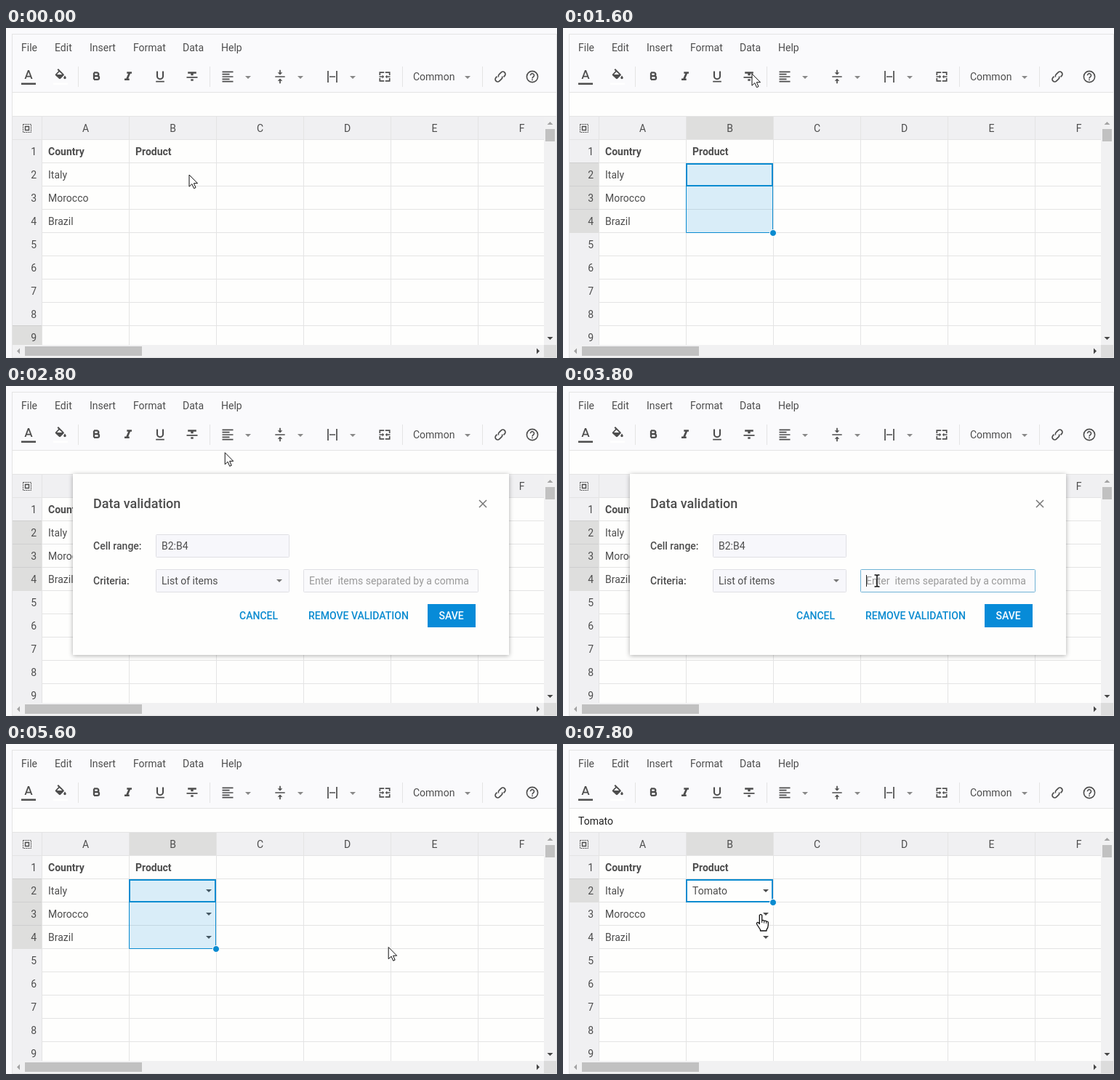
Recreate the animation shown at these times as an HTML page. Size 758 by 454 pixels, loop 8000 ms.

```html
<!DOCTYPE html>
<html lang="en">
<head>
<meta charset="utf-8">
<title>Spreadsheet data validation</title>
<style>
  html, body { margin: 0; width: 100%; height: 100%; overflow: hidden; background: #fafafc; }
  svg { display: block; }
  text { font: 14px Roboto, sans-serif; white-space: pre; }
  .shadow { filter: drop-shadow(0 1px 3px rgba(0, 0, 0, .32)); }
</style>
</head>
<body>
<svg id="stage" width="758" height="454" viewBox="0 0 758 454"></svg>
<script>
const INK = '#4d4d4d', MUTED = '#888', BLUE = '#0a8bd0', LINE = '#e4e4e4', PAPER = '#fefefd';
const HEAD = '#f0f0f2', ACTIVE = '#dededd';
const ITEMS = 'Tomato, Avocado, Pineapple';
const STEP = 200, LOOP = 8000;

const rect = (x, y, w, h, fill, more = '') =>
  `<rect x="${x}" y="${y}" width="${w}" height="${h}" fill="${fill}" ${more}/>`;
const text = (x, middle, value, { fill = INK, weight = 400, size = 14, anchor = 'start' } = {}) =>
  `<text x="${x}" y="${middle + 5}" fill="${fill}" text-anchor="${anchor}" style="font-weight:${weight};font-size:${size}px">${value}</text>`;
const shape = (d, fill = INK, more = '') => `<path d="${d}" fill="${fill}" ${more}/>`;
const stroke = (d, color = INK, width = 1.7, more = '') =>
  `<path d="${d}" fill="none" stroke="${color}" stroke-width="${width}" ${more}/>`;
const at = (x, y, content) => `<g transform="translate(${x} ${y})">${content}</g>`;
const caret = (x, y, fill = MUTED) => shape(`M${x - 4} ${y - 2}h8l-4 4z`, fill);
const hline = (x, y, w, color = LINE) => rect(x, y, w, 1, color);
const vline = (x, y, h, color = LINE) => rect(x, y, 1, h, color);

const columnX = i => 49 + 120 * i;
const rowY = n => 153 + 32 * (n - 1);

// Toolbar icons, each drawn around its own centre.
const icons = {
  color: shape('M-1-9h2L5.5 3H3.5L2.6.5H-2.6L-3.5 3H-5.5zM-2-1.2h4L0-6.6z', INK, 'fill-rule="evenodd"') + rect(-10, 8.5, 20, 2.5, INK),
  fill: shape('M-3-11L4.5-3.5q.8.9 0 1.8L0 2.8q-1 .9-2 0L-6.9-1.8q-.8-.9 0-1.8L-2.8-7.8-4.5-9.7zM-5-3h7.3L-1.5-6.7z', INK, 'fill-rule="evenodd"') +
    shape('M6-1.4q1.7 2 1.7 3a1.7 1.7 0 0 1-3.4 0q0-1 1.7-3z') + rect(-10, 8.5, 20, 2.5, '#fff'),
  bold: stroke('M-3-5.6V3.8M-3-5.6H1a2.3 2.3 0 0 1 0 4.6H-3M-3-1H1.6a2.4 2.4 0 0 1 0 4.9H-3', INK, 2.3),
  italic: shape('M-1.7-6.7H5v2.5H3.1L.3 2.5H1.7V5H-5V2.5h2.3L.2-4.2h-1.9z'),
  underline: stroke('M-4-7.5V-.8a4 4 0 0 0 8 0V-7.5', INK, 2.1) + rect(-5.8, 5.8, 11.6, 1.7, INK),
  strike: shape('M-5.8-6.7H5.8v2.5H1.7v2.5h-3.4v-2.5h-4.1zM-7.5 0h15v1.7h-15zM-1.7 3.3h3.4v2.5h-3.4z'),
  left: stroke('M-7.5-6.7h15M-7.5-3.3h10M-7.5 0h15M-7.5 3.3h10M-7.5 6.7h15'),
  middle: stroke('M-6.7 0H6.7M0-9.2v4M0 9.2v-4') + shape('M-3.3-5.8h6.6L0-2.5zM-3.3 5.8h6.6L0 2.5z'),
  wrap: stroke('M-6-8V8M6-8V8M-4 0H4') ,
  merge: stroke('M-6.7-2V-5.8h5.9M.8-5.8h5.9V-2M-6.7 2v3.8h5.9M.8 5.8h5.9V2M-7.5 0h5M7.5 0h-5') +
    shape('M-3.3-2.5L-.8 0-3.3 2.5zM3.3-2.5L.8 0 3.3 2.5z'),
  link: `<g transform="rotate(-45)">${stroke('M2.2 1.4A3.4 3.4 0 0 1-1 3.4H-5a3.4 3.4 0 0 1 0-6.8h2M-2.2-1.4A3.4 3.4 0 0 1 1-3.4H5a3.4 3.4 0 0 1 0 6.8H3')}</g>`,
  help: `<circle r="7.6" fill="none" stroke="${INK}" stroke-width="1.6"/>` +
    stroke('M-2.5-1.8a2.5 2.5 0 1 1 4.2 1.8Q0 1 0 2.4', INK, 1.6) + rect(-.8, 3.5, 1.6, 1.6, INK)
};
const toolbar = { color: 31, fill: 75, bold: 124, italic: 168, underline: 212, strike: 256, left: 305,
  middle: 377, wrap: 449, merge: 521, link: 680, help: 724 };
const menuBar = { File: 21, Edit: 67, Insert: 115, Format: 175, Data: 243, Help: 296 };

const pointers = {
  arrow: shape('M0 0V16.2L3.9 12.6 6.5 18.7 9 17.6 6.4 11.7H11.5z', '#fff', 'stroke="#111" stroke-linejoin="round"'),
  hand: shape('M-1.7 1.7q1.7-2.6 3.4 0V9q2-1.5 3 .5 2-1 3 .7 2.3-.6 2.6 1.5V15q0 4-2.3 6.5V23H-.5v-1.5L-5 14.5q-1.3-2.2.3-3 1.5-.3 3 2z',
    '#fff', 'stroke="#111" stroke-width="1.3" stroke-linejoin="round"') + stroke('M1.7 9v3M4.7 9.6v3M7.7 10.4v2.5', '#111', 1),
  beam: stroke('M-3.5-8H-1L0-7 1-8H3.5M0-7V7M-3.5 8H-1L0 7 1 8H3.5', '#111', 1.6)
};

// Pointer stops: time, x, y.
const stops = [[0, 252, 202], [400, 240, 203], [800, 249, 252], [1000, 249, 252], [1800, 262, 28], [2000, 262, 30],
  [2400, 277, 59], [2600, 277, 59], [3400, 432, 268], [4600, 432, 268], [5000, 612, 307], [5400, 612, 307],
  [6000, 281, 201], [6600, 281, 201], [7000, 226, 230], [7200, 226, 230], [7800, 272, 234], [LOOP, 272, 234]];

function pointer(t) {
  const i = stops.findIndex(stop => stop[0] > t);
  const [t0, x0, y0] = stops[i - 1], [t1, x1, y1] = stops[i];
  const p = (t - t0) / (t1 - t0), ease = p * p * (3 - 2 * p);
  const kind = (t >= 1800 && t <= 2600) || (t >= 5000 && t < 5400) || t >= 6000 ? 'hand'
    : t >= 3400 && t <= 4600 ? 'beam' : 'arrow';
  return at(x0 + (x1 - x0) * ease, y0 + (y1 - y0) * ease, pointers[kind]);
}

function topBars(t, menuOpen) {
  let out = rect(8, 8, 750, 446, LINE) + rect(9, 9, 748, 444, '#fafafc');
  if (menuOpen) out += rect(231, 9, 53, 36, HEAD);
  for (const [label, x] of Object.entries(menuBar)) out += text(x, 27, label);
  for (const [name, x] of Object.entries(toolbar)) out += at(x, 67, icons[name]);
  for (const x of [333, 405, 477, 635]) out += caret(x, 68);
  for (const x of [99, 280, 545, 655]) out += vline(x, 53, 28);
  out += text(560, 67, 'Common') + hline(9, 88, 748) + rect(9, 89, 748, 32, PAPER) + hline(9, 121, 748);
  return out + (t >= 7400 ? text(21, 106, 'Tomato', { fill: '#222' }) : '');
}

function sheet(t, first, last) {
  const saved = t >= 5400;
  let out = rect(9, 122, 731, 314, HEAD) + rect(50, 154, 690, 282, PAPER);
  if (t >= 400) out += rect(169, 122, 121, 31, ACTIVE);
  for (let n = first; n <= last; n++) out += rect(9, rowY(n), 40, Math.min(33, 436 - rowY(n)), ACTIVE) + hline(9, rowY(n), 40, '#cfcfcf');
  for (let i = 0; i < 6; i++) {
    out += vline(columnX(i), 122, 314) + text(columnX(i) + 60.5, 138, 'ABCDEF'[i], { anchor: 'middle' });
  }
  for (let n = 1; n <= 9; n++) {
    out += hline(49, rowY(n), 691) + text(42, rowY(n) + 17, n, { anchor: 'end' });
  }
  out += hline(9, 153, 40) + stroke('M23.5 132.5h11v11h-11z', INK, 1, 'stroke-dasharray="2 1"') + stroke('M26.5 135.5h5v5h-5z', INK, 1.4);
  out += text(58, 170, 'Country', { weight: 700 }) + text(178, 170, 'Product', { weight: 700 });
  ['Italy', 'Morocco', 'Brazil'].forEach((name, i) => {
    out += text(58, 202 + 32 * i, name);
    if (saved) out += caret(279, 202 + 32 * i, INK);
  });
  if (t >= 7400) out += text(178, 202, 'Tomato');
  return out + (t >= 400 ? selection(last) : '');
}

function selection(last) {
  const bottom = rowY(last + 1), many = last > 2;
  return (many ? rect(170, 186, 119, bottom - 186, '#0a8bdf', 'fill-opacity=".15"') + stroke(`M169.5 186V${bottom + .5}H288.5V186`, BLUE, 1) : '') +
    stroke('M170 187h118v30h-118z', BLUE, 2) +
    `<circle cx="289" cy="${bottom + 1}" r="4.5" fill="${BLUE}" stroke="#fff"/>`;
}

function scrollbars() {
  return rect(740, 122, 17, 314, '#f1f1f2') + rect(9, 436, 731, 17, '#f1f1f2') + rect(740, 436, 17, 17, '#dcdcdc') +
    rect(742, 139, 13, 17, '#c1c1c1') + rect(26, 438, 161, 13, '#c1c1c1') +
    shape('M744.5 133h8l-4-4zM19 440.5v8l-4-4z', '#a3a3a3') +
    shape('M744.5 425h8l-4 4zM730 440.5v8l4-4z', '#454545');
}

function dataMenu(t) {
  const glyphs = [
    'M241.5 56.5h14v4h-14zM241.5 60.5v8.5h7M248 60.5v8M241.5 64.5h10M250 67l2.5 2.5 5-5',
    'M251.5 97.5a4.5 4.5 0 1 1-9 0a4.5 4.5 0 1 1 9 0M250.5 100.5l5.5 5.5',
    'M241 130.5h16M244 135h10M247 139.5h4',
    'M248 165.5h9.5M248 171h9.5M248 176.5h9.5M243.5 165v12M241 167.5l2.5-2.5 2.5 2.5M241 174.5l2.5 2.5 2.5-2.5'
  ];
  let out = rect(231, 45, 180, 144, PAPER, 'class="shadow"');
  if (t >= 2200) out += rect(231, 45, 180, 36, HEAD);
  ['Data validation', 'Search', 'Filter', 'Sort'].forEach((label, i) => {
    out += stroke(glyphs[i], MUTED, 1.6) + text(267, 63 + 36 * i, label, { fill: '#666' });
  });
  return out + shape('M391.5 168l3.5 3-3.5 3z', '#777');
}

function dialog(t) {
  const strong = { weight: 500, fill: BLUE };
  const typed = ITEMS.slice(0, Math.max(0, Math.round(ITEMS.length * (t - 3800) / 800)));
  const field = (x, y, w, border, fill = '#f7f7fb') =>
    rect(x + .5, y + .5, w - 1, 31, fill, `stroke="${border}" rx="1"`);
  let out = rect(92, 121, 600, 249, PAPER, 'class="shadow"') +
    text(120, 162.5, 'Data validation', { size: 18, weight: 500 }) +
    stroke('M651 157l10 10M661 157l-10 10', '#777', 1.5) +
    text(120, 220, 'Cell range:', { weight: 500 }) + text(120, 268, 'Criteria:', { weight: 500 }) +
    field(206, 204, 184, '#dfdfe4') + text(214, 220, 'B2:B4') +
    field(206, 252, 184, '#dfdfe4') + text(214, 268, 'List of items') + caret(376, 268, '#777') +
    field(409, 252, 241, t >= 3600 ? '#6fb3d6' : '#dfdfe4', '#fafafc') +
    (typed ? text(417, 268, typed) : text(417, 268, 'Enter  items separated by a comma', { fill: '#999' }));
  if (t >= 3600 && !typed) out += vline(417, 260, 16, '#222');
  return out + text(321, 316, 'CANCEL', strong) + text(416, 316, 'REMOVE VALIDATION', strong) +
    rect(580, 300, 66, 32, t >= 5000 ? '#309edc' : '#078bd8') + text(595.5, 316, 'SAVE', { weight: 500, fill: '#fff' });
}

function itemList(t) {
  let out = rect(170, 218, 119, 96, PAPER, 'class="shadow"');
  if (t >= 7000) out += rect(170, 218, 119, 32, HEAD);
  ITEMS.split(', ').forEach((item, i) => out += text(178, 234 + 32 * i, item));
  return out;
}

function render(t) {
  const during = (from, to) => t >= from && t < to;
  const menuOpen = during(1800, 2800);
  const [first, last] = t < 400 ? [9, 9] : [2, during(600, 800) ? 3 : during(800, 6200) ? 4 : 2];
  stage.innerHTML = topBars(t, menuOpen) + sheet(t, first, last) + scrollbars() +
    (menuOpen ? dataMenu(t) : '') +
    (during(2800, 5400) ? dialog(t) : '') +
    (during(6600, 7400) ? itemList(t) : '') +
    pointer(t);
}

const stage = document.getElementById('stage');
let shown = -1;
function tick() {
  const t = Math.floor(performance.now() % LOOP / STEP) * STEP;
  if (t !== shown) render(shown = t);
  requestAnimationFrame(tick);
}
tick();
</script>
</body>
</html>
```
